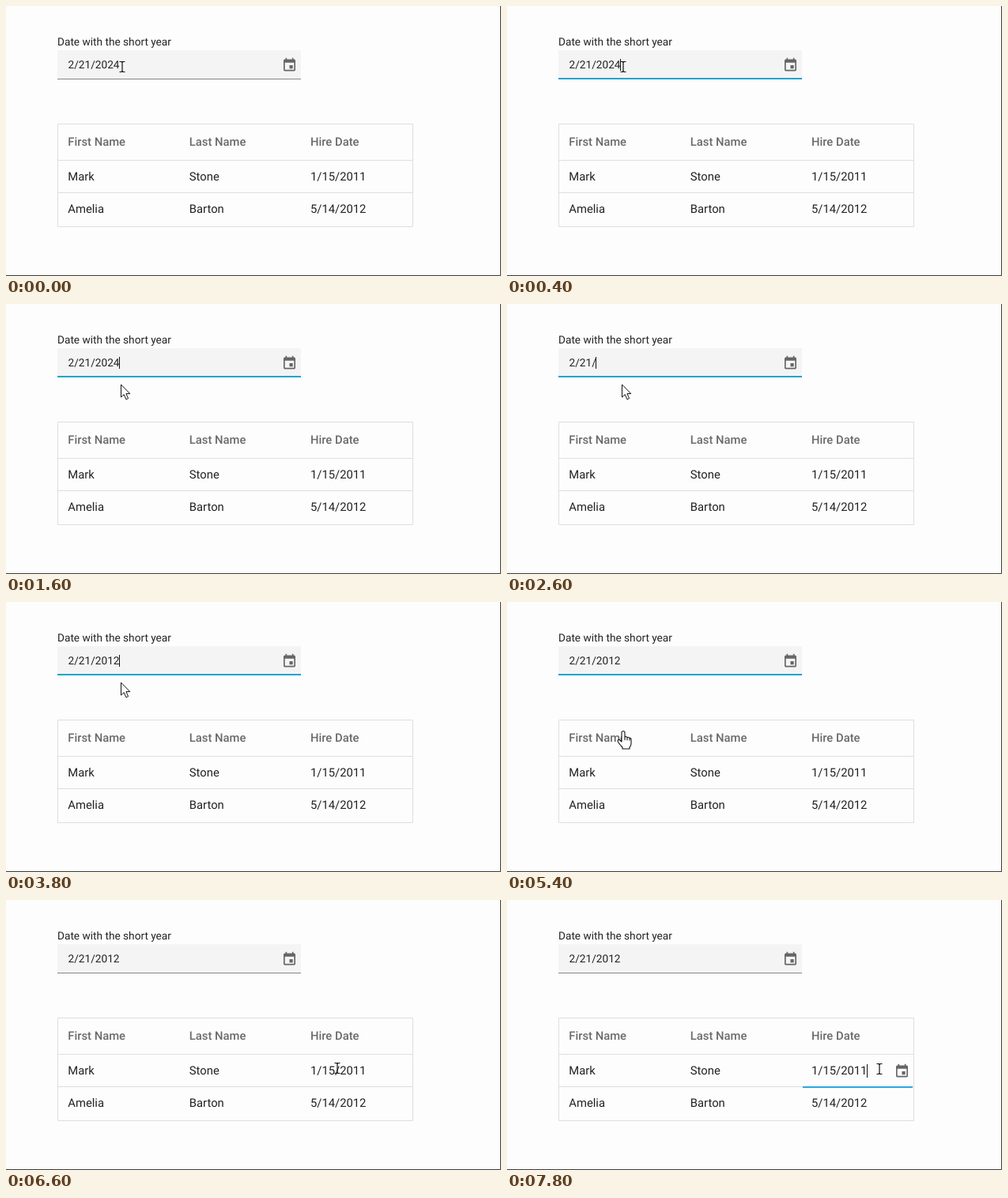
These frames come from a looping animation (626 by 342 pixels, 8000 ms). An HTML page:

```html
<!DOCTYPE html>
<html lang="en">
<head>
<meta charset="utf-8">
<title>Date entry</title>
<style>
html, body { margin: 0; height: 100%; overflow: hidden; background: #fdfdfd; }
svg { display: block; }
text { font: 13.67px Roboto, sans-serif; fill: #222; text-rendering: geometricPrecision; white-space: pre; }
.grid text { font-size: 14.8px; }
.grid .head { font-weight: 500; fill: #6a6a6a; }
.grid path { fill: none; stroke: #dedede; }
.caret { fill: #111; }
.icon { fill: #666; }
</style>
</head>
<body>
<svg width="626" height="342" viewBox="0 0 626 342">
  <defs>
    <path id="calendar" transform="scale(.833)" d="M17 12h-5v5h5v-5zM16 1v2H8V1H6v2H5c-1.1 0-2 .9-2 2v14c0 1.1.9 2 2 2h14c1.1 0 2-.9 2-2V5c0-1.1-.9-2-2-2h-1V1h-2zm3 18H5V8h14v11z"/>
  </defs>
  <path d="M625.5 0V341.5H0" fill="none" stroke="#3c3c3c"/>

  <text x="65" y="50">Date with the short year</text>
  <rect x="65" y="56" width="308" height="37" fill="#f4f4f4"/>
  <rect id="line" x="65" width="308"/>
  <use href="#calendar" class="icon" x="348.5" y="65"/>
  <text id="date" x="78.5" y="79"></text>
  <rect id="dateCaret" class="caret" y="67" width="1" height="15"/>

  <g class="grid" id="grid">
    <path d="M65.5 149.5h449v130h-449zM65 195.5h449M65 236.5h449"/>
  </g>
  <g id="editor">
    <rect x="374" y="236" width="139" height="2" fill="#2ca6de"/>
    <use href="#calendar" class="icon" x="489.5" y="207"/>
    <rect id="cellCaret" class="caret" x="455" y="208" width="1" height="17"/>
  </g>

  <g id="pointer" stroke-linejoin="round">
    <path id="beam" d="M-3.5-6.5h2.5l1 1 1-1h2.5M0-5.5v11M-3.5 6.5h2.5l1-1 1 1h2.5" fill="none" stroke="#111" stroke-width="1.2"/>
    <path id="arrow" d="M0 0v16l3.7-3.4 2.7 6.2 2.7-1.2-2.7-6H11.3z" fill="#fff" stroke="#111"/>
    <path id="hand" d="M-2 13V1.5Q-2-.5 0-.5T2 1.5V7Q3.5 5.8 5 7.7 6.8 6.5 8 8.5 10 8 10 10.5V15Q10 18 8 20V22H-1V20Q-4 17-6.5 13.5C-8 11-5.5 9.5-4 11zM2 7v4M5 7.7v3.6M8 8.5v3" fill="#fff" stroke="#111" stroke-width="1.1"/>
  </g>
</svg>
<script>
const LOOP = 8000, STEP = 200, BLINK = 530;
const $ = id => document.getElementById(id);
const set = (el, attrs) => { for (const k in attrs) el.setAttribute(k, attrs[k]); };
const show = (el, on) => { el.style.display = on ? "" : "none"; };
const clamp = (v, lo, hi) => Math.min(hi, Math.max(lo, v));

const rows = [
  [177, "First Name", "Last Name", "Hire Date"],
  [221, "Mark", "Stone", "1/15/2011"],
  [262, "Amelia", "Barton", "5/14/2012"]
];
rows.forEach(([y, ...cells], r) => cells.forEach((label, c) => {
  const cell = document.createElementNS("http://www.w3.org/2000/svg", "text");
  set(cell, { x: [78.3, 231.8, 385][c], y, class: r ? "" : "head" });
  cell.textContent = label;
  $("grid").append(cell);
}));

// Pointer stops: time, x, y
const stops = [
  [0, 147, 77], [400, 147, 77], [800, 145.5, 102], [4900, 145.5, 102],
  [5400, 147, 164], [5600, 147, 164], [6300, 419, 213], [6700, 419, 213],
  [7200, 471, 214], [LOOP, 471, 214]
];

function pointerAt(t) {
  const i = stops.findIndex(s => s[0] > t);
  const [t0, x0, y0] = stops[i - 1], [t1, x1, y1] = stops[i];
  const p = (t - t0) / (t1 - t0), e = p * p * (3 - 2 * p);
  return [x0 + (x1 - x0) * e, y0 + (y1 - y0) * e];
}

const caretOn = (t, since) => Math.floor((t - since) / BLINK) % 2 === 0;

function draw(t) {
  const erased = clamp((t - 1800) / STEP, 0, 4);
  const typed = clamp((t - 3000) / STEP, 0, 4);
  $("date").textContent = "2/21/" + (typed ? "2012".slice(0, typed) : "2024".slice(0, 4 - erased));

  const focused = t >= 200 && t < 6400;
  set($("line"), focused ? { y: 91, height: 2, fill: "#1ea5cc" } : { y: 92, height: 1, fill: "#858585" });
  const lastKey = typed ? 3000 + typed * STEP : erased ? 1800 + erased * STEP : 200;
  set($("dateCaret"), { x: Math.floor(78.5 + $("date").getComputedTextLength()) });
  show($("dateCaret"), focused && caretOn(t, lastKey));

  const opened = 6640;
  show($("editor"), t >= opened);
  show($("cellCaret"), caretOn(t, opened));

  const [x, y] = pointerAt(t);
  const shape = y < 93 || (y > 195 && x > 385) ? "beam" : y > 150 && y < 195 ? "hand" : "arrow";
  for (const id of ["beam", "arrow", "hand"]) show($(id), id === shape);
  set($("pointer"), { transform: `translate(${x} ${y})` });
}

const start = performance.now();
function tick() {
  const t = (performance.now() - start) % LOOP;
  draw(Math.floor(t / STEP) * STEP);
  requestAnimationFrame(tick);
}
tick();
</script>
</body>
</html>
```
